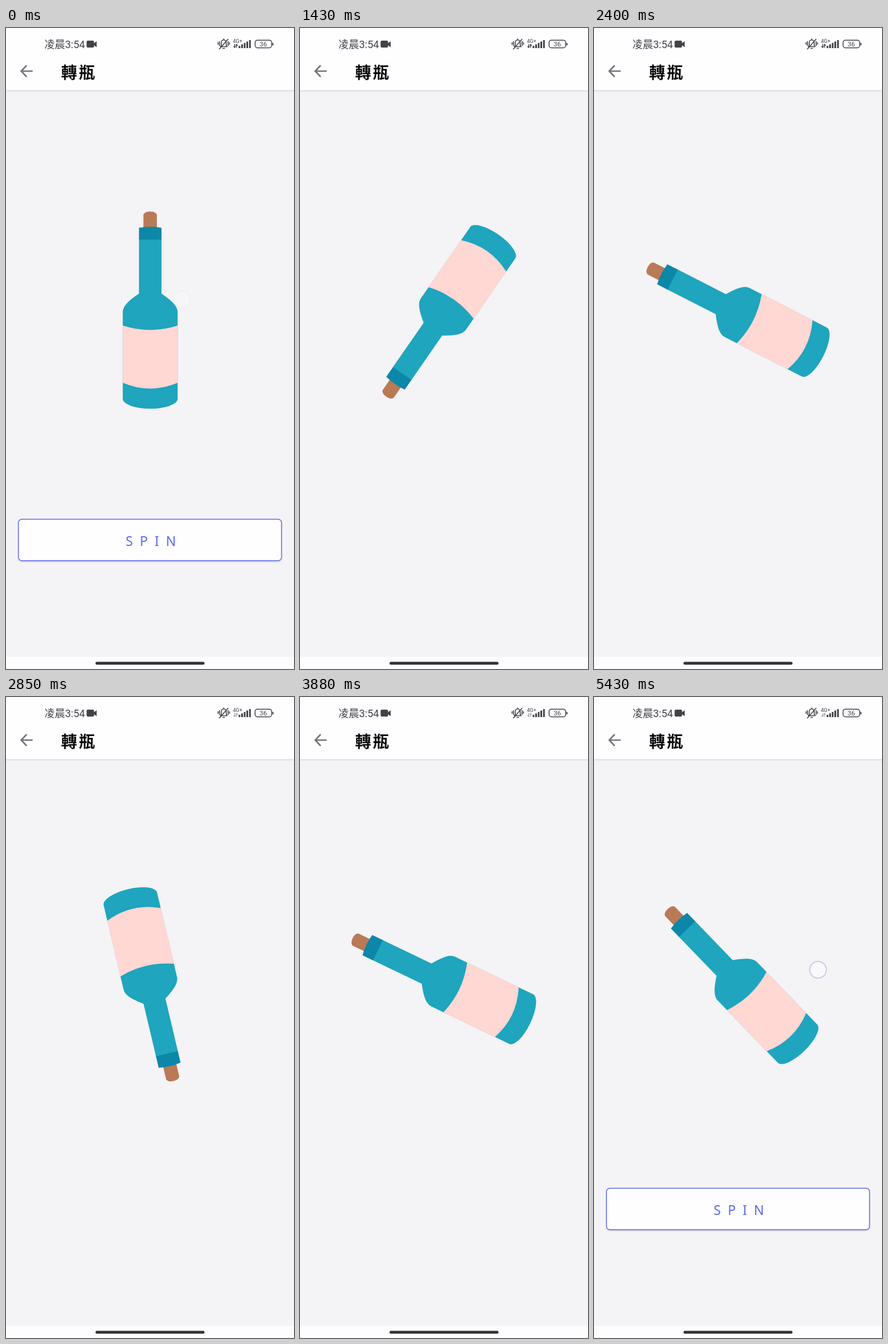
An HTML page that plays this animation: 502x1115 px, repeating every 5.46 s.

```html
<!DOCTYPE html>
<html lang="zh-Hant">
<head>
<meta charset="utf-8">
<title>轉瓶</title>
<style>
  html, body { margin: 0; width: 100%; height: 100%; overflow: hidden; background: #f4f3f6; }
  svg { display: block; width: 100%; height: 100%; }
  text { font-family: Roboto, "Noto Sans CJK TC", "Noto Sans CJK SC", "Noto Sans CJK", sans-serif; fill: #434246; }
  .line { fill: none; stroke: #434246; stroke-linecap: round; stroke-linejoin: round; }
  .solid { fill: #434246; }
</style>
</head>
<body>
<svg viewBox="0 0 502 1115">
  <defs>
    <linearGradient id="barShadow" x2="0" y2="1">
      <stop offset="0" stop-color="#d6d5d9"/>
      <stop offset="1" stop-color="#f4f3f6"/>
    </linearGradient>
    <filter id="blur" x="-5%" y="-20%" width="110%" height="140%"><feGaussianBlur stdDeviation="1.5"/></filter>
  </defs>

  <rect width="502" height="1115" fill="#f4f3f6"/>
  <rect y="107" width="502" height="5" fill="url(#barShadow)"/>
  <rect width="502" height="108" fill="#fefdff"/>
  <rect y="1094" width="502" height="21" fill="#fdfcfe"/>
  <rect x="156" y="1102.5" width="190" height="5" rx="2.5" fill="#343336"/>

  <!-- status bar -->
  <text x="67" y="35" font-size="18">凌晨3:54</text>
  <path class="solid" d="M142.500 22H151.500Q153.500 22 153.500 24V26.500L158 23V33.500L153.500 30V32Q153.500 34 151.500 34H142.500Q140.500 34 140.500 32V24Q140.500 22 142.500 22Z"/>
  <g class="line" stroke-width="1.600">
    <path d="M373.500 32.500H385.500L383.800 30V26C383.800 22.500 382 20.800 379.500 20.800S375.200 22.500 375.200 26V30ZM378 35.500H381M379.500 19V20.500"/>
    <path d="M372 36.500L387 19.500"/>
    <path d="M372 23.500V30.500M369.600 25.500V28.500M387.200 23.500V30.500M389.500 25.500V28.500"/>
  </g>
  <text x="395.500" y="26" font-size="9">4G+</text>
  <path id="data" class="line" stroke-width="1.300" d="M398.500 28.500V34M396.800 32.300L398.500 34L400 32.300M402 34V28.500M400.600 30.200L402 28.500L403.700 30.200"/>
  <path class="solid" d="M405.500 31h3v4h-3zM410 28.500h3v6.500h-3zM414.500 26h3v9h-3zM419 23.500h3v11.500h-3zM423.700 21h3v14h-3z"/>
  <rect class="line" x="434.200" y="21.200" width="28.800" height="13.300" rx="4" stroke-width="1.500"/>
  <path class="solid" d="M464.300 25.500Q466.500 25.500 466.500 28T464.300 30.500Z"/>
  <text x="448.500" y="32" font-size="11.500" text-anchor="middle">36</text>

  <!-- app bar -->
  <path d="M46.500 75H27M36 65L26.500 75L36 85" fill="none" stroke="#747377" stroke-width="2.600"/>
  <text x="96" y="88" font-size="28" font-weight="700" letter-spacing="3" style="fill:#0a0a0b">轉瓶</text>

  <g id="button">
    <rect id="shadow" x="22" y="856" width="458" height="72" rx="6" fill="#77767c" opacity=".55" filter="url(#blur)"/>
    <rect x="21.700" y="854.500" width="458.600" height="72" rx="6" fill="#fefdff" stroke="#5d6ce6" stroke-width="1.500"/>
    <text x="208.500" y="901" font-size="23" letter-spacing="12" style="font-family:'Noto Sans',sans-serif;fill:#5c6ceb">SPIN</text>
  </g>

  <g id="bottle">
    <path fill="#b97a56" d="M239.500 348V324.500Q242 319.200 251.200 319.200T263 324.500V348Z"/>
    <path fill="#1fa5be" d="M231.800 366H271V462C287 473 299.200 483 299.200 494V645A47.850 17.300 0 0 1 203.500 645V494C203.500 483 215.500 473 231.800 462Z"/>
    <path fill="#0c87a8" d="M231.800 347.500Q251.400 344 271 347.500V368H231.800Z"/>
    <path fill="#ffd7d3" d="M203.300 517.500Q251.300 533 299.400 517.500V617Q251.300 637.500 203.300 617Z"/>
  </g>

  <circle id="touch" r="14.500" stroke-width="2"/>
</svg>
<script>
  const LOOP = 5460, STEP = 30, PHASE = 10;
  const SPIN_START = 380, SPIN_END = 4710;
  // [time in ms, degrees clockwise]
  const spin = [[SPIN_START, 0], [1000, 219.6], [1840, 1044.2], [2380, 1737],
                [3310, 2925.1], [3880, 3535.6], [SPIN_END, 3916]];
  const el = Object.fromEntries(['bottle', 'button', 'shadow', 'touch', 'data']
    .map(id => [id, document.getElementById(id)]));

  const slope = i => (spin[i + 1][1] - spin[i][1]) / (spin[i + 1][0] - spin[i][0]);

  function speed(i) {
    if (i === 0 || i === spin.length - 1) return 0;
    const before = spin[i][0] - spin[i - 1][0], after = spin[i + 1][0] - spin[i][0];
    return (before * slope(i) + after * slope(i - 1)) / (before + after);
  }

  // Smooth cubic through the spin points, at rest on both ends
  function angleAt(t) {
    if (t <= SPIN_START) return 0;
    if (t >= SPIN_END) return spin.at(-1)[1];
    const i = spin.findIndex(p => p[0] > t) - 1;
    const [t0, a0] = spin[i], [t1, a1] = spin[i + 1];
    const span = t1 - t0, u = (t - t0) / span, v = 1 - u;
    return a0 * v * v * (1 + 2 * u) + a1 * u * u * (3 - 2 * u)
      + span * u * v * (v * speed(i) - u * speed(i + 1));
  }

  function showTouch(x, y, fill, stroke, opacity) {
    const attrs = { cx: x, cy: y, fill, stroke, opacity };
    for (const key in attrs) el.touch.setAttribute(key, attrs[key]);
  }

  function draw(now) {
    const t = now % LOOP;
    const held = Math.floor((t - PHASE) / STEP) * STEP + PHASE;
    el.bottle.setAttribute('transform', `rotate(${angleAt(held) % 360} 251.2 496)`);

    const idle = t < SPIN_START || t >= SPIN_END;
    el.button.setAttribute('visibility', idle ? 'visible' : 'hidden');
    el.shadow.setAttribute('y', t > 240 && t < SPIN_START ? 859 : 856);

    const dataActive = t < 300 || (t >= 1430 && t < 2550);
    el.data.setAttribute('opacity', dataActive ? 1 : 0.45);

    if (t < 60) showTouch(307, 472, '#f8f7f9', '#eeedf1', 0.6);
    else if (t >= 5270) showTouch(390.5, 474.5, '#f9f8fc', '#c9cde4', 1);
    else showTouch(0, 0, 'none', 'none', 0);
  }

  const origin = performance.now();
  function tick() {
    draw(performance.now() - origin);
    requestAnimationFrame(tick);
  }
  tick();
</script>
</body>
</html>
```
